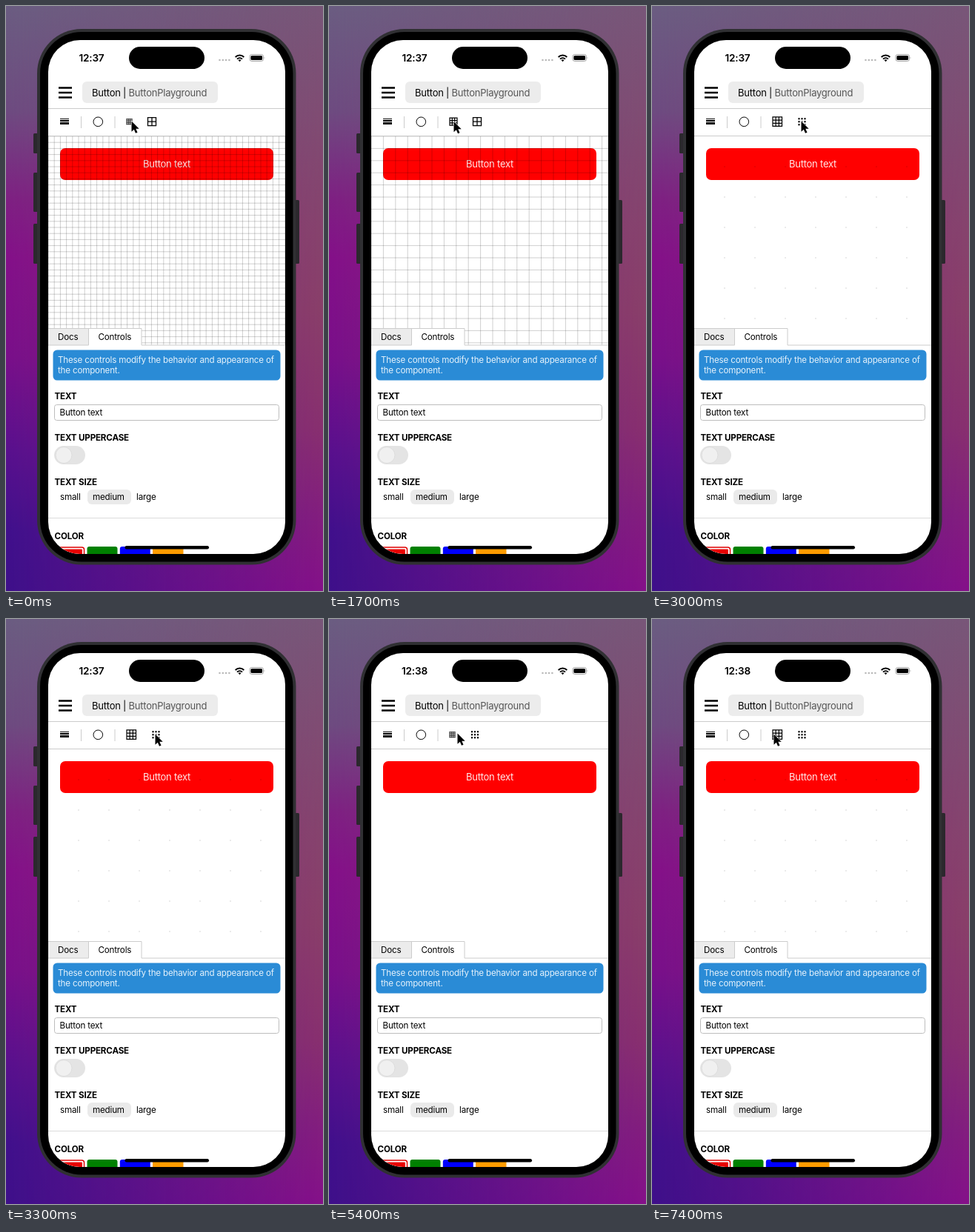
Animation of 428 by 790 pixels, one loop 8 s. Source, as an HTML page:

```html
<!DOCTYPE html>
<html lang="en">
<head>
<meta charset="utf-8">
<title>Button playground</title>
<style>
  html, body { margin: 0; width: 100%; height: 100%; overflow: hidden; }
  svg { display: block; }
  text { font: 11.6px Inter, "Open Sans", sans-serif; letter-spacing: -.015em; white-space: pre; }
  .head { font-weight: 700; }
  .big { font-size: 13px; letter-spacing: -.018em; }
  .rule { stroke: #ccc; fill: none; }
</style>
</head>
<body>
<svg width="428" height="790" viewBox="0 0 428 790">
  <defs>
    <linearGradient id="left" x2="0" y2="1">
      <stop offset="0" stop-color="#6b5d82"/>
      <stop offset=".18" stop-color="#6e4b81"/>
      <stop offset=".33" stop-color="#7e2083"/>
      <stop offset=".43" stop-color="#841089"/>
      <stop offset=".6" stop-color="#790f8a"/>
      <stop offset=".76" stop-color="#59108e"/>
      <stop offset=".9" stop-color="#40108c"/>
      <stop offset="1" stop-color="#3e108a"/>
    </linearGradient>
    <linearGradient id="right" x2="0" y2="1">
      <stop offset="0" stop-color="#785678"/>
      <stop offset=".3" stop-color="#84466f"/>
      <stop offset=".52" stop-color="#893f69"/>
      <stop offset=".72" stop-color="#88306f"/>
      <stop offset=".87" stop-color="#831e7e"/>
      <stop offset="1" stop-color="#851089"/>
    </linearGradient>
    <linearGradient id="fade">
      <stop offset="0" stop-color="#000"/>
      <stop offset="1" stop-color="#fff"/>
    </linearGradient>
    <mask id="blend"><rect width="428" height="790" fill="url(#fade)"/></mask>
    <clipPath id="screen"><rect x="57" y="46" width="320" height="694" rx="43"/></clipPath>
    <clipPath id="canvas"><rect x="57" y="176" width="320" height="282"/></clipPath>
  </defs>

  <rect width="428" height="790" fill="url(#left)"/>
  <rect width="428" height="790" fill="url(#right)" mask="url(#blend)"/>

  <g fill="#2b282d">
    <rect x="37" y="172" width="8" height="27" rx="1.5"/>
    <rect x="37" y="225" width="8" height="53" rx="1.5"/>
    <rect x="37" y="294" width="8" height="54" rx="1.5"/>
    <rect x="388" y="262" width="8" height="86" rx="1.5"/>
  </g>
  <rect x="42" y="31" width="349.500" height="723.500" rx="60" fill="#303033"/>
  <rect x="46" y="35" width="341.500" height="715.500" rx="56" fill="#000"/>

  <g clip-path="url(#screen)">
    <rect x="57" y="46" width="320" height="694" fill="#fff"/>

    <text id="clock" x="115.500" y="75" text-anchor="middle" style="font-size:13.600px;font-weight:600"></text>
    <rect x="166" y="55" width="102" height="30" rx="15"/>
    <path d="M288.500 73h0m4.300 0h0m4.300 0h0m4.300 0h0" stroke="#b9b9b9" stroke-width="2.600" stroke-linecap="round"/>
    <g fill="none" stroke="#000" stroke-width="2">
      <path d="M309.700 69a8 8 0 0 1 11.600 0M312 71.600a5 5 0 0 1 7 0"/>
      <path d="M315.500 75.200l-2-2.100a3 3 0 0 1 4 0z" fill="#000" stroke="none"/>
    </g>
    <rect x="329" y="65.500" width="18.500" height="9" rx="2.800" fill="none" stroke="#999" stroke-width=".9"/>
    <rect x="330.400" y="66.900" width="15.700" height="6.200" rx="1.600"/>
    <path d="M348.700 68.500q1.400 1.500 0 3z" fill="#999"/>

    <path d="M71 110.500h18M71 117h18M71 123.500h18" stroke="#000" stroke-width="2.300"/>
    <rect x="103" y="102" width="183" height="29" rx="6" fill="#ececec"/>
    <text class="big" x="116" y="121.500">Button |</text>
    <text class="big" x="165.500" y="121.500" fill="#555">ButtonPlayground</text>
    <path class="rule" d="M57 138.500h320M57 175.500h320M101.500 149v16M147 149v16"/>

    <path d="M73 152.400h12" stroke="#000"/>
    <path d="M73 155h12" stroke="#000" stroke-width="1.900"/>
    <path d="M73 158.600h12" stroke="#000" stroke-width="3"/>
    <circle cx="124.300" cy="156.300" r="6.300" fill="none" stroke="#000"/>
    <path id="sizeIcon" fill="none" stroke="#000"/>
    <path id="modeIcon" fill="none" stroke="#000"/>

    <rect x="73" y="192" width="288" height="43" rx="7" fill="#f00"/>
    <text class="big" x="217" y="218" text-anchor="middle" fill="#ffe8e8">Button text</text>
    <path id="pattern" fill="none" stroke="#000" clip-path="url(#canvas)"/>

    <rect x="57" y="435" width="54" height="23" fill="#ececec"/>
    <rect x="111" y="435" width="72" height="24" fill="#fff"/>
    <path class="rule" d="M57 435.500h126v22.500h194M111.500 435.500v22.500H57"/>
    <text x="70" y="451">Docs</text>
    <text x="124.500" y="451">Controls</text>

    <rect x="63.500" y="464.500" width="307" height="41" rx="5.500" fill="#2a8bd6"/>
    <g fill="#e6f2fb">
      <text x="70" y="482.300">These controls modify the behavior and appearance of</text>
      <text x="70" y="496.300">the component.</text>
    </g>

    <text class="head" x="65.500" y="531.300">TEXT</text>
    <rect x="65.500" y="538.500" width="303" height="21" rx="3" fill="#fff" stroke="#bdbdbd"/>
    <text x="72.500" y="553">Button text</text>

    <text class="head" x="65.500" y="587.300">TEXT UPPERCASE</text>
    <rect x="65" y="594" width="42" height="25" rx="12.500" fill="#e4e4e4"/>
    <circle cx="78" cy="606.500" r="11" fill="#f0f0f0" stroke="#d8d8d8" stroke-width=".8"/>

    <text class="head" x="65.500" y="647">TEXT SIZE</text>
    <rect x="110" y="653" width="59" height="20" rx="6" fill="#eaeaea"/>
    <text x="73" y="667">small</text>
    <text x="117" y="667">medium</text>
    <text x="176" y="667">large</text>
    <path class="rule" d="M57 691.500h320" style="stroke:#dcdcdc"/>

    <text class="head" x="65.500" y="720">COLOR</text>
    <rect x="65" y="731" width="40.500" height="40" rx="3" fill="#fff" stroke="#e00000" stroke-width="1.500"/>
    <rect x="68" y="733.500" width="35" height="30" rx="1" fill="#e80000"/>
    <rect x="109.500" y="730" width="41" height="40" rx="3" fill="#008000"/>
    <rect x="153.800" y="730" width="41" height="40" rx="3" fill="#00f"/>
    <rect x="198" y="730" width="41.500" height="40" rx="3" fill="#ff9c00"/>
    <rect x="160.500" y="729" width="113.500" height="4.400" rx="2.200"/>

    <path id="cursor" d="M0 0V14.200L3.300 11.200L5.500 16.300L8 15.200L5.800 10.300H10.200Z"
          stroke="#fff" stroke-width="1.100" stroke-linejoin="round" paint-order="stroke"/>
  </g>
</svg>
<script>
const LOOP = 8000, STEP = 100, MINUTE = 5000;

// Clicks: [time, cell size, icon size, dotted]
const clicks = [
  [0, 8.2, 7, false],
  [600, 16.4, 10, false],
  [1800, 41, 12.5, false],
  [2900, 41, 12.5, true],
  [5000, 8.2, 7, true],
  [6000, 16.4, 10, true],
  [6900, 41, 12.5, true]
];

// Cursor stops: [time, x, y]
const stops = [
  [0, 169.5, 155.5], [600, 169.5, 155.5], [1200, 168.5, 156], [2400, 168.5, 156],
  [2800, 201.5, 155.5], [3400, 201.5, 155.5], [4200, 173.5, 154.5],
  [5700, 173.5, 154.5], [6000, 164.5, 155.5], [8000, 164.5, 155.5]
];

const el = id => document.getElementById(id);
const set = (id, attrs) => {
  for (const key in attrs) el(id).setAttribute(key, attrs[key]);
};
const ease = u => u * u * (3 - 2 * u);

function lines(x, y, w, h, dx, dy) {
  let d = '';
  for (let i = x; i <= x + w + .1; i += dx) d += `M${i} ${y}v${h}`;
  for (let j = y; j <= y + h + .1; j += dy) d += `M${x} ${j}h${w}`;
  return d;
}

function dots(x, y, w, h, gap) {
  let d = '';
  for (let j = y; j <= y + h + .1; j += gap)
    for (let i = x; i <= x + w + .1; i += gap) d += `M${i} ${j}h0`;
  return d;
}

function drawState([, cell, icon, dotted]) {
  const sx = 163, cy = 156.2, mx = sx + icon + 21.5;
  set('sizeIcon', {
    d: lines(sx, cy - icon / 2, icon, icon, icon / 3, icon / 3),
    'stroke-width': icon < 8 ? .8 : 1.2,
    'stroke-linecap': 'square'
  });
  set('modeIcon', dotted
    ? { d: dots(mx + 1.5, cy - 4, 8, 8, 4), 'stroke-width': 2.4, 'stroke-linecap': 'round' }
    : { d: lines(mx, cy - 5.5, 11, 11, 5.5, 5.5), 'stroke-width': 1.3, 'stroke-linecap': 'square' });

  // The finest dots are too faint to show.
  const faint = dotted && cell < 10;
  set('pattern', {
    d: faint ? '' : (dotted ? dots(57 + cell, 176 + cell, 320, 282, cell)
                            : lines(57, 176, 328, 287, cell, cell)),
    'stroke-width': dotted ? 1.5 : .9,
    'stroke-linecap': dotted ? 'round' : 'butt',
    'stroke-opacity': dotted ? .2 : .21
  });
}

function cursorAt(t) {
  const i = stops.findIndex(s => s[0] > t);
  const [t0, x0, y0] = stops[i - 1], [t1, x1, y1] = stops[i];
  const u = ease((t - t0) / (t1 - t0));
  return [x0 + (x1 - x0) * u, y0 + (y1 - y0) * u];
}

let shown;
function render(time) {
  const t = Math.floor(time % LOOP / STEP) * STEP;
  const state = clicks.filter(c => c[0] <= t).pop();
  if (state !== shown) drawState(shown = state);
  set('cursor', { transform: `translate(${cursorAt(t)})` });
  el('clock').textContent = t < MINUTE ? '12:37' : '12:38';
}

const start = performance.now();
function frame() {
  render(performance.now() - start);
  requestAnimationFrame(frame);
}
frame();
</script>
</body>
</html>
```
